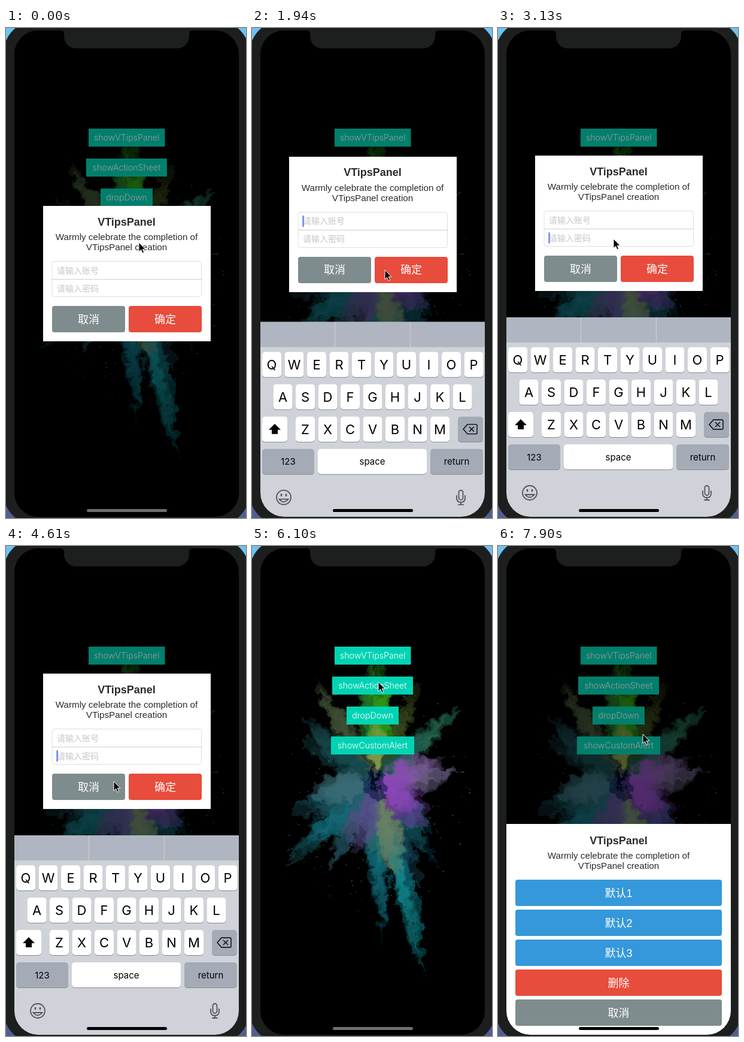
These frames come from a looping animation (401 px wide and 818 px high, 8000 ms). An HTML page:

```html
<!DOCTYPE html>
<html lang="zh-CN">
<head>
<meta charset="utf-8">
<style>
html, body { margin: 0; width: 100%; height: 100%; overflow: hidden; background: #000; }
svg { display: block; width: 401px; height: 818px; }
text { text-anchor: middle; }
.link { font: 300 14.2px Inter, sans-serif; fill: #fff; }
.title { font: bold 18px "Liberation Sans", sans-serif; fill: #2b2b2b; }
.body { font: 15.2px "Liberation Sans", sans-serif; fill: #2b2b2b; }
.hint { font: 14px "Noto Sans CJK SC", "Noto Sans CJK", sans-serif; fill: #c7c7cd; text-anchor: start; }
.action { font: 18px "Liberation Sans", "Noto Sans CJK SC", "Noto Sans CJK", sans-serif; fill: #fff; }
.letter { font: 22px Inter, sans-serif; }
.word { font: 15px Inter, sans-serif; }
.line { fill: none; stroke: #50545a; stroke-width: 1.8; stroke-linecap: round; }
</style>
</head>
<body>
<svg id="stage" viewBox="0 0 401 818"></svg>
<script>
const NAME = 'VTipsPanel', LOOP = 8000;
const BLUE = '#3498db', RED = '#e74c3c', GRAY = '#7f8c8d', KEY_GRAY = '#a4abb7';

let seed = 11;
const rand = () => (seed = seed * 16807 % 2147483647) / 2147483647;

const rect = (x, y, w, h, fill, r = 0, extra = '') =>
  `<rect x="${x}" y="${y}" width="${w}" height="${h}" rx="${r}" fill="${fill}" ${extra}/>`;
const text = (cls, x, y, s, id = '') => `<text class="${cls}" x="${x}" y="${y}" id="${id}">${s}</text>`;
const group = (id, content) => `<g id="${id}">${content}</g>`;

// Powder burst: tip x, tip y, width, colour
const CENTER = [207, 392];
const plumes = [
  [104, 218, 44, '#46583a'], [80, 283, 40, '#1c5258'], [82, 322, 40, '#17474c'],
  [282, 222, 34, '#3b4c1e'], [349, 269, 30, '#2b7558'], [300, 315, 44, '#1c564a'],
  [186, 212, 38, '#24605a'], [207, 165, 46, '#267a1c'], [222, 205, 38, '#35a015'],
  [203, 285, 34, '#8a9450'], [55, 542, 30, '#125058'], [88, 495, 62, '#136a76'],
  [62, 445, 50, '#18525c'], [95, 412, 72, '#3b6c78'], [125, 545, 36, '#255a66'],
  [314, 538, 30, '#104c55'], [300, 480, 46, '#126a72'], [276, 590, 42, '#15465e'],
  [290, 716, 30, '#0e868e'], [220, 662, 36, '#0f7484'], [244, 550, 50, '#6e7f60'],
  [175, 515, 58, '#57508c'], [354, 377, 46, '#6b5f86'], [322, 352, 44, '#7a5a96'],
  [298, 466, 48, '#6f3596'], [290, 415, 76, '#8a48b6']
];

function plume([tipX, tipY, width, color]) {
  const dx = tipX - CENTER[0], dy = tipY - CENTER[1], len = Math.hypot(dx, dy);
  const nx = -dy / len, ny = dx / len;
  const point = (along, side) =>
    `${(CENTER[0] + dx * along + nx * side).toFixed(1)} ${(CENTER[1] + dy * along + ny * side).toFixed(1)}`;
  let out = '';
  for (let i = 0; i < 8; i++) {
    const reach = 1 - i * .06, shift = i ? (rand() - .5) * width : 0, w = width * (.3 + rand() * .5);
    out += `<path d="M${point(.06, 0)}Q${point(reach * .72, shift + w)} ${point(reach, shift * .7)}` +
      `Q${point(reach * .72, shift - w)} ${point(.06, 0)}" fill="${color}" opacity="${(.2 + rand() * .25).toFixed(2)}"/>`;
  }
  return out;
}

function dust() {
  const a = rand() * Math.PI * 2, d = 90 + rand() * 120;
  const x = CENTER[0] + Math.cos(a) * d * .75, y = CENTER[1] + 20 + Math.sin(a) * d;
  const color = ['#1a8088', '#4a7a48', '#6a4a8a'][rand() * 3 | 0];
  return `<circle cx="${x.toFixed(1)}" cy="${y.toFixed(1)}" r="${(.3 + rand() * .7).toFixed(2)}" fill="${color}"/>`;
}

const photo = `<g filter="url(#powder)">${plumes.map(plume).join('')}
  <ellipse cx="206" cy="398" rx="19" ry="27" fill="#0b1345" opacity=".55"/></g>` +
  Array.from({ length: 240 }, dust).join('');

const link = (x, y, w, label, id) => rect(x, y, w, 30, '#00d3b3') + text('link', x + w / 2, y + 20, label, id);
const links = link(138, 168, 127.5, 'show' + NAME) + link(134, 218, 135, 'showActionSheet', 'pressed') +
  link(158, 268, 87, 'dropDown') + link(132, 318, 139, 'showCustomAlert');

const heading = y => text('title', 201.5, y + 32.5, NAME) +
  text('body', 201.5, y + 57, 'Warmly celebrate the completion of') +
  text('body', 201.5, y + 74, `K${''}`.slice(1) + NAME + ' creation');
const action = (x, y, w, fill, label) => rect(x, y, w, 44, fill, 4) + text('action', x + w / 2, y + 28.5, label);

// Dialog and sheet are drawn from y = 0
const dialog = rect(62, 0, 280, 226, '#fff') + heading(0) +
  rect(77, 92.5, 249.5, 59, '#fff', 4, 'stroke="#dedede"') + rect(77, 122, 250, 1, '#cfcfcf') +
  text('hint', 85, 112.5, '请输入账号') + text('hint', 85, 142.5, '请输入密码') +
  rect(84.5, 98, 2, 19, '#4a6be0', 1, 'id="caret"') +
  action(77, 167, 122, GRAY, '取消') + action(205, 167, 122, RED, '确定');

const sheet = rect(14, 0, 375, 360, '#fff') + heading(1) +
  [[BLUE, '默认1'], [BLUE, '默认2'], [BLUE, '默认3'], [RED, '删除'], [GRAY, '取消']]
    .map(([fill, label], i) => action(29, 93 + i * 50, 345, fill, label)).join('');

const key = (x, y, w, fill, cls = '', label = '') => rect(x, y + 1, w, 42, '#888b90', 5) +
  rect(x, y, w, 42, fill, 5) + (label && text(cls, x + w / 2, y + (cls === 'letter' ? 29 : 26.5), label));
const row = (x, y, letters) => [...letters].map((c, i) => key(x + i * 37.5, y, 32, '#fff', 'letter', c)).join('');

const keyboard = rect(14, 483, 375, 335, '#cfd2d8') + rect(14, 483, 375, 42, '#b0b6c1') +
  rect(138, 483, 1, 42, '#cdd1d7') + rect(264, 483, 1, 42, '#cdd1d7') +
  row(17, 533, 'QWERTYUIOP') + row(35.5, 587, 'ASDFGHJKL') + row(73, 641, 'ZXCVBNM') +
  key(17, 641, 42, '#fff') + key(344, 641, 42, KEY_GRAY) +
  key(17, 695, 87, KEY_GRAY, 'word', '123') + key(110, 695, 182, '#fff', 'word', 'space') +
  key(298, 695, 88, KEY_GRAY, 'word', 'return') +
  `<path d="M38 653l10 10h-5v7h-10v-7h-5z"/>
  <path d="M353 662l7-8h14q2 0 2 2v12q0 2-2 2h-14zM363 658l8 8m0-8l-8 8" fill="none" stroke="#000" stroke-width="1.4"/>
  <g class="line"><circle cx="53" cy="776" r="12"/><path d="M45.500 779q7.500 9 15 0z"/>
  <path d="M49 771v2m8-2v2" stroke-width="2.6"/>
  <rect x="345.500" y="764" width="7" height="16" rx="3.500"/>
  <path d="M342 773v4q0 7 7 7t7-7v-4M349 784v4m-4 0h8"/></g>`;

document.getElementById('stage').innerHTML = `<defs>
  <linearGradient id="desk" x2="0" y2="1"><stop stop-color="#6cc3f2"/><stop offset="1" stop-color="#525f8e"/></linearGradient>
  <filter id="powder"><feTurbulence type="fractalNoise" baseFrequency=".07" numOctaves="4" seed="4"/>
    <feDisplacementMap in="SourceGraphic" scale="26" xChannelSelector="R" yChannelSelector="G"/>
    <feGaussianBlur stdDeviation=".5"/></filter>
  <clipPath id="screen"><rect x="14" y="4" width="375" height="812" rx="40"/></clipPath></defs>` +
  rect(0, 0, 401, 818, 'url(#desk)') + rect(-4, -12, 411, 842, '#1c1f1e', 54) +
  `<g clip-path="url(#screen)">${rect(14, 4, 375, 812, '#000')}${photo}${links}
    ${rect(14, 4, 375, 812, '#000', 0, 'id="dim"')}
    ${group('dialog', dialog)}${group('sheet', sheet)}${group('keyboard', keyboard)}</g>
  <path d="M91 3v1q6 0 6 6v4a20 20 0 0 0 20 20H286a20 20 0 0 0 20-20v-4q0-6 6-6v-1z" fill="#1c1f1e"/>` +
  rect(135, 803, 134, 5, '#000', 2.5, 'id="home"') +
  `<path id="pointer" d="M0 0V15.500L3.600 12.200L6 17.800L8.600 16.700L6.200 11.200H11Z" stroke="#fff"/>`;

const el = id => document.getElementById(id);
const set = (id, name, value) => el(id).setAttribute(name, value);
const move = (id, x, y) => set(id, 'transform', `translate(${x} ${y})`);
const clamp = v => Math.min(1, Math.max(0, v));
const ramp = (t, from, to) => clamp((t - from) / (to - from));
const ease = p => p * p * (3 - 2 * p);
const spring = ms => { const x = Math.max(0, ms) * .0142; return 1 - (1 + x) * Math.exp(-x); };

// Pointer stops: time, x, y
const stops = [
  [0, 222, 358], [100, 222, 358], [590, 222, 404], [2680, 222, 404], [2980, 193, 352], [3900, 193, 352],
  [4450, 180, 393], [5000, 180, 393], [5210, 202, 287], [5950, 211, 227], [7650, 211, 227],
  [7900, 242, 314], [LOOP, 242, 314]
];

function pointerAt(t) {
  const i = stops.findIndex(s => s[0] > t);
  const [t0, x0, y0] = stops[i - 1], [t1, x1, y1] = stops[i];
  const p = ease(ramp(t, t0, t1));
  return [x0 + (x1 - x0) * p, y0 + (y1 - y0) * p];
}

function draw(t) {
  const keys = spring(t - 1538) - spring(t - 5006);
  const shown = 1 - ramp(t, 5000, 5180);
  const lifted = ease(ramp(t, 6713, 6963));
  const second = t > 2960;

  set('dim', 'opacity', .4 * (shown + lifted));
  set('dialog', 'opacity', shown);
  move('dialog', 0, 297 - 84 * spring(t - 1538));
  move('keyboard', 0, 335 * (1 - keys));
  move('sheet', 0, 818 - 354 * lifted);
  move('caret', 0, second ? 30 : 0);
  set('caret', 'opacity', t < 1538 ? 0 : clamp(1.2 + 2 * Math.cos((t - 860) / 1000 * 2 * Math.PI)));
  set('pressed', 'opacity', t > 6500 && t < 7100 ? .4 : 1);
  set('home', 'fill', Math.max(keys, lifted) > .05 ? '#000' : '#6e6e6e');
  move('pointer', ...pointerAt(t));
}

let last = -1;
function tick(now) {
  const step = Math.floor((now % LOOP + 10) / 148.7);
  if (step !== last) draw((last = step) * 149.05);
  requestAnimationFrame(tick);
}
draw(0);
requestAnimationFrame(tick);
</script>
</body>
</html>
```
